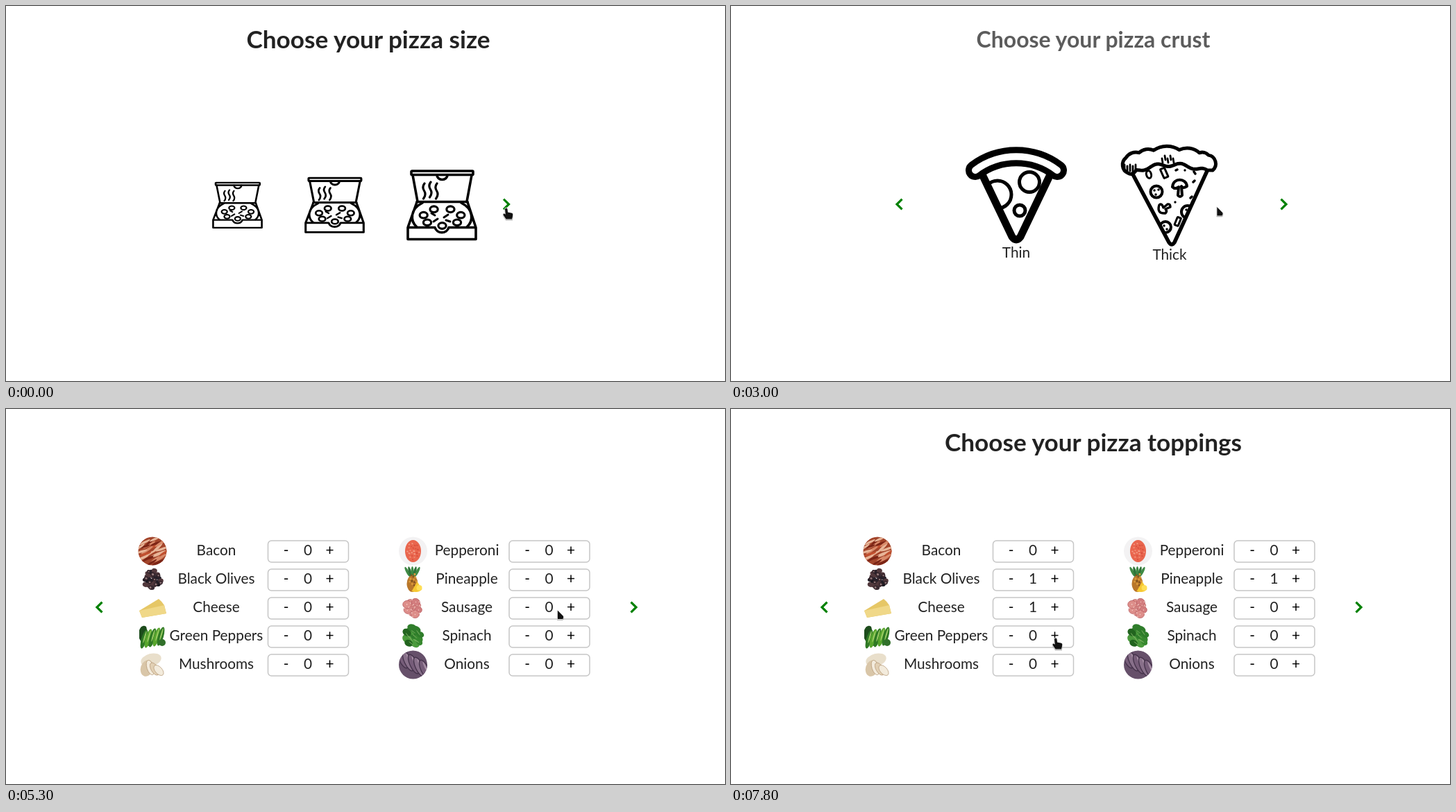
Recreate the animation shown at these times as an HTML page. Size 1036 by 541 pixels, loop 8 s.

```html
<!DOCTYPE html>
<html lang="en">
<head>
<meta charset="utf-8">
<title>Pizza order</title>
<style>
html, body { margin: 0; width: 100%; height: 100%; overflow: hidden; background: #fff; }
svg { display: block; }
text { font: 20.8px Lato, sans-serif; fill: #222; text-anchor: middle; }
.title { font-size: 35.2px; font-weight: 700; }
.btn { fill: #000; }
.line { fill: none; stroke: #000; stroke-linecap: round; stroke-linejoin: round; }
.chev { fill: none; stroke: green; stroke-width: 3.2; }
.cursor { fill: #111; stroke: #fff; stroke-width: 1.4; paint-order: stroke; filter: drop-shadow(0 1px .7px #0006); }
</style>
</head>
<body>
<svg width="1036" height="541" viewBox="0 0 1036 541">
<defs>
  <g id="box" class="line" stroke-width="3.6">
    <rect x="7" y="2" width="89" height="5.5" rx="1"/>
    <path d="M9 8L16 46M94 8L87 46M15 46.5H88M44 8A7.5 6.5 0 0 0 59 8"/>
    <path d="M15 47L2.5 82M88 47L99.5 82M23 48C5 57 5 74 15 83M79 48C97 57 97 74 87 83"/>
    <path d="M2 83.5H41A10.5 10.5 0 0 0 61 83.5H100V100.5H2Z"/>
    <path stroke-width="3" d="M36 63l5 3M39 75l6-4M54 69l6-4M57 73l6 2"/>
    <g id="fill" stroke-width="3.2"></g>
  </g>
  <clipPath id="thinClip"><path d="M362 238L411 338L460 238Z"/></clipPath>
  <clipPath id="thickClip"><path d="M577 235L635 345L688 235Z"/></clipPath>
  <clipPath id="disc"><circle r="20.5"/></clipPath>
  <path id="band" d="M352 237A98.5 98.5 0 0 1 470 237"/>
</defs>

<g class="page" id="boxes"></g>

<g class="page">
  <g class="line" stroke-width="5">
    <circle cx="384" cy="272" r="20" clip-path="url(#thinClip)"/>
    <circle cx="430" cy="254" r="14.5"/>
    <circle cx="416" cy="295" r="8"/>
    <path stroke-width="11" d="M361 241L405 333Q411 341 417 333L461 241"/>
    <use href="#band" stroke-width="28"/>
    <use href="#band" stroke="#fff" stroke-width="10"/>
  </g>
  <g class="line" stroke-width="4">
    <path stroke-width="5.5" d="M578 241L631 341Q635 347 639 341L686 238"/>
    <g clip-path="url(#thickClip)">
      <circle cx="613" cy="268" r="8.5"/><circle cx="658" cy="297" r="9"/><circle cx="626" cy="319" r="8"/>
    </g>
    <ellipse cx="602" cy="243" rx="3.5" ry="5.5" transform="rotate(-15 602 243)" stroke-width="3"/>
    <rect x="621" y="234" width="6.5" height="14" rx="1" transform="rotate(-24 624 241)" stroke-width="3"/>
    <rect x="641" y="305" width="5.5" height="12" rx="1" transform="rotate(22 644 311)" stroke-width="3"/>
    <path d="M636 261C637 247 656 248 657 260Q651 264 649 260L650 273Q647 277 644 273L645 261Q640 265 636 261Z"/>
    <path stroke-width="3.4" d="M617 287Q613 300 626 299Q629 296 626 293L633 290Q633 285 629 286L623 291Q621 284 617 287Z"/>
    <path stroke-width="3.4" d="M610 266h.1M616 265h.1M612 272h.1M656 294h.1M624 317h.1M628 322h.1M641 237l2-1M654 237v.1M667 239l2 3M668 252l-2 2M640 283v.1M664 275l-2 2"/>
    <path id="crust" stroke-width="5" style="fill:#fff"/>
    <path id="hatch" stroke-width="2.8"/>
  </g>
  <text x="411" y="363">Thin</text>
  <text x="632" y="366">Thick</text>
</g>

<g class="page" id="toppings"></g>
<g id="chevs"></g>
<text class="title" id="title" y="11.5"></text>
<path class="cursor" id="cursor"/>
</svg>

<script>
const $ = id => document.getElementById(id);
const LOOP = 8000;
const repeat = (n, make) => Array.from({ length: n }, (_, i) => make(i)).join('');

let seed = 7;
const rnd = () => (seed = seed * 16807 % 2147483647) / 2147483647;
const pick = list => list[Math.floor(rnd() * list.length)];
const ell = (x, y, rx, ry, fill, turn = 0, more = '') =>
  `<ellipse cx="${x}" cy="${y}" rx="${rx}" ry="${ry}" fill="${fill}" transform="rotate(${turn} ${x} ${y})" ${more}/>`;
const shape = (d, fill, more = '') => `<path d="${d}" fill="${fill}" ${more}/>`;
const inDisc = (fill, body) => `<g clip-path="url(#disc)"><circle r="21" fill="${fill}"/>${body}</g>`;

// n ellipses spread over an oval
const scatter = (n, w, h, rx, ry, colors, turn = 0, more = '') => repeat(n, i => {
  const a = i * 2.4, r = Math.sqrt((i + .5) / n), size = .8 + rnd() * .4;
  return ell(Math.cos(a) * r * w, Math.sin(a) * r * h, rx * size, ry * size, pick(colors), turn + rnd() * 30, more);
});

const art = {
  Bacon: () => inDisc('#a3452b',
    scatter(26, 19, 19, 9, 1.7, ['#d98a6a', '#7c2516', '#e8b598', '#c2502f'], -45)),
  'Black Olives': () => scatter(24, 13, 13, 3.4, 3, ['#262029', '#3b2d35', '#191820', '#51383c'])
    + scatter(9, 13, 14, 2.2, 2, ['#93787a'], 0, 'stroke="#33242a" stroke-width="1.6"'),
  Cheese: () => shape('M-19 4L9-13Q14-9 17-4L20 8L-15 14Z', '#e6c766')
    + shape('M-19 4L17-4L20 8L-15 14Z', '#f0d888'),
  'Green Peppers': () => shape('M-19-9Q-15-18-9-14L-2 14Q-14 15-19 3Z', '#1d4c1c')
    + repeat(5, i => ell(i * 6 - 12, 4 - i, 4, 14, i % 2 ? '#58a52d' : '#2f7925', 16)
      + ell(i * 6 - 11, 1 - i, 1, 9, '#9ccb65', 16))
    + ell(14, 9, 5, 5, '#31702a'),
  Mushrooms: () => ell(-2, -7, 15, 9, '#e9dfcb', -15) + ell(-8, 5, 9, 12, '#d9c6a8', 18)
    + repeat(3, i => ell(i * 6 - 3, 4 + i * 2, 5, 11 - i, i % 2 ? '#e2d0b4' : '#f3ebdc', -18 - i * 12,
      'stroke="#b79a78" stroke-width=".7"')),
  Pepperoni: () => inDisc('#f3f2f3', ell(0, 0, 11.5, 16, '#e9664e')
    + scatter(22, 9, 13, 1.4, 1, ['#f29a83', '#d94f3c'])),
  Pineapple: () => repeat(5, i => ell(i * 3.5 - 8, -11, 2, 8, i % 2 ? '#2f7338' : '#3f8a45', i * 14 - 28))
    + ell(-1, 6, 8, 12, '#b9762a') + scatter(12, 6, 9, 1.4, 1.4, ['#80521f', '#d99a3c'])
    + shape('M-2 17L6 3L13 14Q8 20-2 17Z', '#f6c832') + ell(9, 12, 4, 4, '#ffdf56'),
  Sausage: () => scatter(13, 10, 10, 5.4, 4.8, ['#dd8e8a', '#d27d7e', '#e6a29c'], 0, 'stroke="#bd6468" stroke-width=".8"')
    + scatter(20, 13, 13, .8, .7, ['#f4cbc4']),
  Spinach: () => scatter(17, 12, 13, 6.5, 5, ['#2f7d2b', '#22641f', '#4b9a3c', '#37882f'], 20)
    + scatter(7, 10, 11, 5, .5, ['#82b566'], 30),
  Onions: () => inDisc('#66506a', repeat(5, i =>
    ell(i * 8 - 15, i * 4 - 9, 5.5, 15, i % 2 ? '#88708a' : '#765d79', -25, 'stroke="#45334b" stroke-width="1.4"')
    + ell(i * 8 - 14, i * 4 - 12, 1.2, 9, '#a891a6', -25)))
};
const names = Object.keys(art);

// pizza box: ring of toppings and steam
$('fill').innerHTML = repeat(7, i => {
  const a = Math.PI * (.5 + i * 2 / 7);
  return `<ellipse cx="${51.5 + 27.5 * Math.cos(a)}" cy="${68.5 + 12.5 * Math.sin(a)}" rx="5.6" ry="4.3"/>`;
}) + repeat(3, i => `<path d="M${26 + i * 9} ${20 - i % 2 * 2}q-4 5-.5 10.500t-1 11.500"/>`);

const boxes = [[297, 253.5, .716, .66], [430, 246.5, .853, .795], [577, 236, 1, 1]];
$('boxes').innerHTML = boxes.map(([x, y, sx, sy]) =>
  `<use href="#box" transform="translate(${x} ${y}) scale(${sx} ${sy})"/>`).join('');

// thick crust: bumps on top, a wave below
const archY = x => 207 + .0025 * (x - 631) ** 2;
let crust = 'M572 241A13 13 0 0 1 569 219', edge = 569;
for (const x of [588, 609, 646, 675, 688]) {
  const r = (x - edge) * .9;
  crust += `A${r} ${r} 0 0 1 ${x} ${archY(x)}`;
  edge = x;
}
crust += 'A12.5 12.5 0 0 1 694 237';
for (let x = 686; x >= 584; x -= 3)
  crust += `L${x} ${229 + .0036 * (x - 634) ** 2 + 2.5 * Math.sin(x / 5.5)}`;
$('crust').setAttribute('d', crust + 'Q579 245 572 241Z');
$('hatch').setAttribute('d', repeat(5, i => `M${567 + i * 4} ${229 + i % 2 * 2}v9M${621 + i * 4} ${220 - i % 2 * 4}l1 6`));

const rowY = i => 204 + i % 5 * 41;
$('toppings').innerHTML = names.map((name, i) => {
  const right = i > 4, y = rowY(i), x = right ? 725 : 377.5;
  return `<g transform="translate(${right ? 586.5 : 211} ${y + 1})">${art[name]()}</g>
    <text x="${right ? 664 : 303}" y="${y + 7}">${name}</text>
    <rect x="${x}" y="${y - 14}" width="116" height="31" rx="5" fill="none" stroke="#c6c6c6" stroke-width="1.5"/>
    <text class="btn" x="${x + 26}" y="${y + 7}">-</text>
    <text class="count" x="${x + 57.5}" y="${y + 6.5}">0</text>
    <text class="btn" x="${x + 89}" y="${y + 7}">+</text>`;
}).join('');

// hot areas: left, top, width, height
const pages = [
  { from: 0, start: -2000, step: 100, title: 'Choose your pizza size', next: 721,
    hot: boxes.map(([x, y, sx, sy]) => [x, y, 102 * sx, 102 * sy]) },
  { from: 3000, start: 2800, step: 200, title: 'Choose your pizza crust', prev: 242.5, next: 796.5,
    hot: [[338, 203, 146, 140], [562, 200, 137, 147]] },
  { from: 5300, start: 5385, step: 100, title: 'Choose your pizza toppings', prev: 134.5, next: 904.5,
    hot: names.map((_, i) => [i > 4 ? 803 : 456, rowY(i) - 13, 22, 26]) }
];
pages.forEach(p => p.hot.push([p.next - 5, 276, 11, 20]));
const hit = (page, x, y) => page.hot.findIndex(([l, t, w, h]) => x >= l && x <= l + w && y >= t && y <= t + h);

// cursor moves: arrival time, duration, x, y, sag of the path
const moves = [
  [0, 0, 721, 292.5, 0],
  [900, 800, 463, 291, 36],
  [1900, 700, 738, 275, 0],
  [2400, 500, 715, 285, 0],
  [3000, 0, 700, 290, 0],
  [3800, 800, 636, 247, 0],
  [4800, 800, 794.5, 290.5, 0],
  [5900, 200, 804, 264, 0],
  [6100, 200, 808, 250, 0],
  [7000, 600, 466, 250, 10],
  [7400, 200, 466, 289, 0],
  [7800, 200, 468, 331.5, 0]
];

function place(t) {
  const i = moves.findLastIndex(([end, dur]) => t >= end - dur);
  const [end, dur, x, y, sag] = moves[i];
  const [, , x0, y0] = moves[Math.max(0, i - 1)];
  const u = dur ? Math.min(1, 1 - (end - t) / dur) : 1, e = u * u * (3 - 2 * u);
  return [x0 + (x - x0) * e, y0 + (y - y0) * e + sag * 4 * e * (1 - e)];
}

// each click adds one of the topping under the cursor
const clicks = [6400, 7200, 7600].map(at => ({ at, item: hit(pages[2], ...place(at - 1)) }));

// critically damped spring from 0 to 1
function spring(ms) {
  const s = Math.max(0, ms) * .013;
  return 1 - (1 + s) * Math.exp(-s);
}

const HAND = 'M-2 .5Q-2-1-.2-1Q1.5-1 1.5 .5L2 5L8 6.3Q9.7 7 9.3 9L8.2 15H-.5L-4.5 9Q-5 6.5-3 7L-1.3 8.3Z';
const ARROW = 'M.3 0V12.5H7.5Q9 11.5 8.6 8.5Z';
const chevron = (x, dir) =>
  `<path class="chev" d="M${x - 4 * dir} 278.7L${x + 3.5 * dir} 286L${x - 4 * dir} 293.3"/>`;
const groups = document.querySelectorAll('.page');
const counts = document.querySelectorAll('.count');
let shown = -1;

function draw(now) {
  const n = pages.findLastIndex(p => now >= p.from), page = pages[n];
  const t = now - (now - page.from) % page.step;
  if (n !== shown) {
    shown = n;
    groups.forEach((g, i) => g.style.display = i === n ? '' : 'none');
    $('title').textContent = page.title;
    $('chevs').innerHTML = (page.prev ? chevron(page.prev, -1) : '') + chevron(page.next, 1);
  }
  const p = spring(t - page.start);
  $('title').setAttribute('transform', `translate(522 49.5) scale(${.66 + .34 * p})`);
  $('title').setAttribute('opacity', p);
  counts.forEach((c, i) => c.textContent = clicks.filter(k => k.item === i && t >= k.at).length);

  const [x, y] = place(t);
  $('cursor').setAttribute('d', hit(page, x, y) < 0 ? ARROW : HAND);
  $('cursor').setAttribute('transform', `translate(${x} ${y})`);
}

function frame() {
  draw(performance.now() % LOOP);
  requestAnimationFrame(frame);
}
frame();
</script>
</body>
</html>
```
